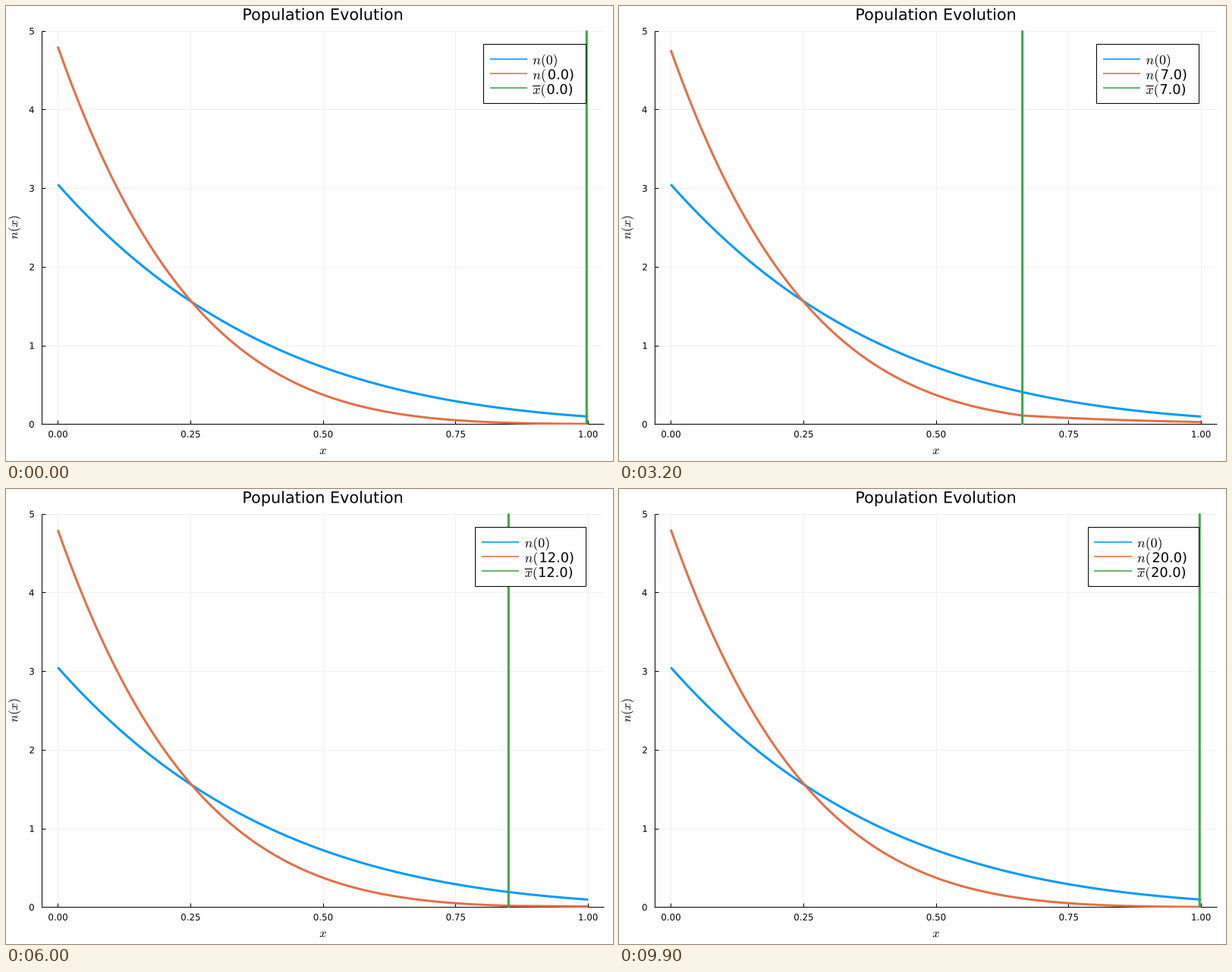
Write a matplotlib script that moves like this. It is 800 px wide and 600 px high and loops after 10000 ms.

```python
import numpy as np
import matplotlib.pyplot as plt
from matplotlib.animation import FuncAnimation
from matplotlib.patches import PathPatch, Rectangle
from matplotlib.textpath import TextPath
from matplotlib.transforms import Affine2D

W, H, DPI = 800, 600, 100
FRAMES, INTERVAL = 100, 100
BLUE, ORANGE, GREEN = "#009afa", "#e36f47", "#3ea44e"
GRID = "#f0f0f0"
LEFT, RIGHT, TOP, BOTTOM = 47.3, 788.2, 32.8, 551.3
X0, X_SCALE = 68.3, 698.9
Y_SCALE = (BOTTOM - TOP) / 5
TICK, AXIS_LABEL, KEY, TITLE = 11.85, 16.3, 17.75, 20.75
K_START, K_END = 0.5, 0.8
DECAY = 0.2

plt.rcParams["font.family"] = "DejaVu Sans"
plt.rcParams["mathtext.fontset"] = "cm"

fig = plt.figure(figsize=(W / DPI, H / DPI), dpi=DPI, facecolor="white")
ax = fig.add_axes([0, 0, 1, 1])
ax.set(xlim=(0, W), ylim=(H, 0))
ax.axis("off")


def px(x):
    return X0 + X_SCALE * np.asarray(x)


def py(y):
    return BOTTOM - Y_SCALE * np.asarray(y)


def density(k, x):
    """Profile (1 - kx)^5 with unit mass on [0, 1]."""
    return 6 * k * (1 - k * x) ** 5 / (1 - (1 - k) ** 6)


def mass_below(k, x):
    return (1 - (1 - k * x) ** 6) / (1 - (1 - k) ** 6)


def front(t):
    """Point where the new profile meets the decaying one, total mass 1."""
    s = np.exp(-DECAY * t)
    lo, hi = 0.0, 1.0
    for _ in range(50):
        mid = (lo + hi) / 2
        ratio = density(K_START, mid) / density(K_END, mid)
        mass = ratio * mass_below(K_END, mid) + 1 - mass_below(K_START, mid)
        lo, hi = (mid, hi) if s * mass < 1 else (lo, mid)
    return lo


def population(x, xbar, t):
    old = np.exp(-DECAY * t) * density(K_START, x)
    edge = np.exp(-DECAY * t) * density(K_START, xbar)
    new = edge * density(K_END, x) / density(K_END, xbar)
    return np.where(x < xbar, new, old)


def line(xs, ys, color, width, **kw):
    return ax.plot(xs, ys, color=color, lw=width * 72 / DPI,
                   solid_capstyle="butt", **kw)[0]


def glyphs(s, x, y, size, ha="left", angle=0):
    """Outline text on baseline y; ha refers to the inked box."""
    path = TextPath((0, 0), s, size=size)
    box = path.get_extents()
    dx = {"left": 0, "center": -(box.x0 + box.x1) / 2, "right": -box.x1}[ha]
    move = Affine2D().translate(dx, 0).scale(1, -1)
    return move.rotate_deg(angle).translate(x, y).transform_path(path)


def text(*args, z=2, **kw):
    return ax.add_patch(PathPatch(glyphs(*args, **kw), fc="black", lw=0, zorder=z))


# axes
x_ticks = [0, 0.25, 0.5, 0.75, 1]
for v in x_ticks:
    line([px(v)] * 2, [TOP, BOTTOM], GRID, 1, zorder=0)
for v in range(6):
    line([LEFT, RIGHT], [py(v)] * 2, GRID, 1, zorder=0)
line([LEFT] * 2, [TOP, BOTTOM + 0.5], "black", 1, zorder=1)
line([LEFT, RIGHT], [BOTTOM] * 2, "black", 1, zorder=1)
for v in x_ticks:
    line([px(v)] * 2, [BOTTOM - 5, BOTTOM], "black", 1, zorder=1)
    text(f"{v:.2f}", px(v) + 0.2, 568.8, TICK, ha="center")
for v in range(6):
    line([LEFT, LEFT + 5], [py(v)] * 2, "black", 1, zorder=1)
    text(str(v), 36.8, py(v) + 4.6, TICK, ha="right")
text("Population Evolution", 417.7, 18.4, TITLE, ha="center")
text("$x$", 417.7, 591, AXIS_LABEL, ha="center")
text("$n(x)$", 15.2, 292.3, AXIS_LABEL, ha="center", angle=-90)

# data
clip = Rectangle((LEFT, TOP - 0.5), RIGHT - LEFT, BOTTOM - TOP + 1,
                 transform=ax.transData)
grid = np.linspace(0, 1, 301)
start = line(px(grid), py(density(K_START, grid)), BLUE, 3, zorder=3)
curve = line([], [], ORANGE, 3, zorder=4)
marker = line([], [], GREEN, 3, zorder=5, snap=False)
for item in (start, curve, marker):
    item.set_clip_path(clip)

# legend
frame_box = ax.add_patch(Rectangle((0, 50), 1, 77.6, fc="white", ec="black",
                                   lw=0.72, zorder=6))
keys = [line([], [], c, 1.6, zorder=7) for c in (BLUE, ORANGE, GREEN)]
KEY_ROWS = (69.5, 89, 108.4)
BASELINES = (76.8, 96.5, 116)
symbols = ("$n(0)$", "$n($", r"$\overline{x}($")
heads = [text(s, 0, 0, KEY, z=7) for s in symbols]
tails = [text("0.0)", 0, 0, KEY, z=7) for _ in range(2)]
TAIL_RIGHT = (747.4, 746.0)


def set_legend(value):
    number = f"{value:.1f})"
    ink = TextPath((0, 0), number, size=KEY).get_extents().width
    left = TAIL_RIGHT[0] - ink - 86
    frame_box.set_x(left)
    frame_box.set_width(763.6 - left)
    for key, row in zip(keys, KEY_ROWS):
        key.set_data([left + 8.6, left + 57.8], [row, row])
    for head, s, base in zip(heads, symbols, BASELINES):
        head.set_path(glyphs(s, left + 65.3, base, KEY))
    for tail, right, base in zip(tails, TAIL_RIGHT, BASELINES[1:]):
        tail.set_path(glyphs(number, right, base, KEY, ha="right"))


# time at which the front reaches x = 1
T_END = np.log(density(K_START, 1) / density(K_END, 1)) / DECAY


def update(i):
    # at t = 0 the front is degenerate and sits at the far end
    t = T_END * (i or FRAMES - 1) / FRAMES
    xbar = front(t)
    xs = np.sort(np.append(grid, xbar))
    curve.set_data(px(xs), py(population(xs, xbar, t)))
    marker.set_data([px(xbar)] * 2, [TOP - 0.5, BOTTOM + 0.5])
    set_legend(round(T_END * i / FRAMES))
    return curve, marker


anim = FuncAnimation(fig, update, frames=FRAMES, interval=INTERVAL,
                     repeat=True, repeat_delay=0, blit=False)
plt.show()
```
